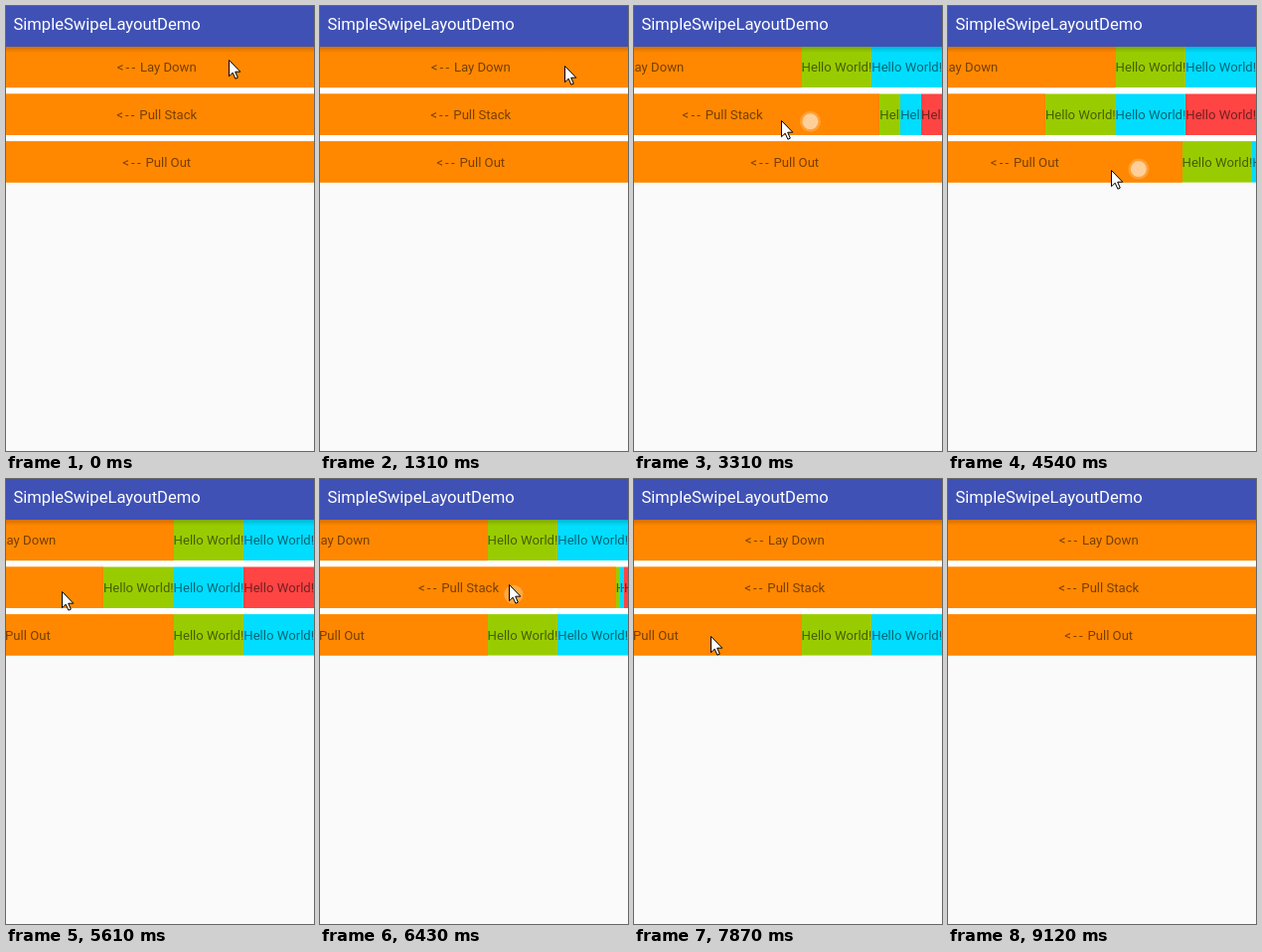
An HTML page with a canvas that plays this animation: 310 px wide and 448 px high, repeating every 9.84 s.

```html
<!DOCTYPE html>
<html lang="en">
<head>
<meta charset="utf-8">
<title>SimpleSwipeLayoutDemo</title>
<style>
  html, body { margin: 0; width: 100%; height: 100%; overflow: hidden; background: #fafafa; }
  canvas { display: block; width: 310px; height: 448px; }
</style>
</head>
<body>
<canvas id="stage"></canvas>
<script>
const W = 310, H = 448, HEADER = 41;
const LOOP = 9840, START = 500, TICK = 134.7, POINTER_GONE = 9100;
const DRAG = 480, GLIDE = 450, SLIDE_DELAY = 150, SLIDE = 560;
const ROW_TOP = 40.5, ROW_PITCH = 47.8, ROW_H = 41.7, ITEM_W = 70.7, BASELINE = 25.5;
const ORANGE = '#ff8800', GREEN = '#99cc00', CYAN = '#00ddff', RED = '#ff4444';
const TEXT = 'rgba(0,0,0,.54)', FONT = '13.13px Roboto, sans-serif';

const rows = [
  { label: 'Lay Down', kind: 'under', colors: [GREEN, CYAN] },
  { label: 'Pull Stack', kind: 'stack', colors: [GREEN, CYAN, RED] },
  { label: 'Pull Out', kind: 'follow', colors: [GREEN, CYAN] }
];

// Pointer strokes; those with a row swipe it open or closed.
const moves = [
  { start: 500, from: [224, 54], to: [246, 60] },
  { start: 1745, from: [246, 60], to: [168, 88], row: 0, open: true },
  { start: 2939, from: [246, 112], to: [138, 115], row: 1, open: true },
  { start: 4106, from: [256, 156], to: [162, 165], row: 2, open: true },
  { start: 5090, from: [78, 185], to: [56, 113] },
  { start: 5875, from: [60, 112], to: [199, 110], row: 1, open: false },
  { start: 6910, from: [64, 57], to: [190, 62], row: 0, open: false },
  { start: 8000, from: [77, 158], to: [200, 163], row: 2, open: false }
];
const exit = [250, 433];

const canvas = document.getElementById('stage');
const ctx = canvas.getContext('2d');
const dpr = window.devicePixelRatio || 1;
canvas.width = W * dpr;
canvas.height = H * dpr;
ctx.scale(dpr, dpr);

const arrow = new Path2D('M.5 .5V16.7L4.2 13.2L6.9 19.2L9.3 18.1L6.7 12.2H11.8Z');

const clamp = x => Math.min(1, Math.max(0, x));
const ease = x => clamp(x) ** 2 * (3 - 2 * clamp(x));
const mix = (a, b, k) => a.map((v, i) => v + (b[i] - v) * k);

// Steeper than ease: a slow drag, a quick middle, a soft settle.
function slide(x) {
  const a = clamp(x) ** 3, b = (1 - clamp(x)) ** 3;
  return a / (a + b);
}

const snap = t => START + TICK * Math.floor((t - START) / TICK + 0.3);
const rowTop = index => ROW_TOP + ROW_PITCH * index;

function pointerAt(t) {
  const index = Math.max(0, moves.findLastIndex(move => move.start <= t));
  const { start, from, to } = moves[index];
  const elapsed = t - start;
  if (elapsed <= DRAG) return mix(from, to, ease(elapsed / DRAG));
  const next = index + 1 < moves.length ? moves[index + 1].from : exit;
  return mix(to, next, ease((elapsed - DRAG) / GLIDE));
}

function openness(index, t) {
  const move = moves.findLast(m => m.row === index && m.start <= t);
  if (!move) return 0;
  const progress = slide((t - move.start - SLIDE_DELAY) / SLIDE);
  return move.open ? progress : 1 - progress;
}

function rect(x, y, w, h, color) {
  ctx.fillStyle = color;
  ctx.fillRect(x, y, w, h);
}

function text(str, x, y, color = TEXT, font = FONT) {
  ctx.font = font;
  ctx.fillStyle = color;
  ctx.fillText(str, x, y);
}

function drawItem(left, right, top, color) {
  const x = Math.round(left), width = Math.round(right) - x;
  ctx.save();
  ctx.beginPath();
  ctx.rect(x, top, width, ROW_H);
  ctx.clip();
  rect(x, top, width, ROW_H, color);
  text('Hello World!', left, top + BASELINE);
  ctx.restore();
}

function drawRow({ label, kind, colors }, index, t) {
  const top = rowTop(index), full = colors.length * ITEM_W;
  const offset = full * openness(index, t), edge = W - offset;
  const width = kind === 'stack' ? offset / colors.length : ITEM_W;
  const left = kind === 'under' ? W - full : edge;
  if (offset > 0) {
    colors.forEach((color, i) => drawItem(left + i * width, left + (i + 1) * width, top, color));
  }
  rect(0, top, Math.round(edge), ROW_H, ORANGE);

  ctx.font = FONT;
  const arrowWidth = 23.2;
  const x = 151.7 - (arrowWidth + ctx.measureText(label).width) / 2 - offset;
  ctx.letterSpacing = '2.2px';
  text('<--', x, top + BASELINE);
  ctx.letterSpacing = '0px';
  text(label, x + arrowWidth, top + BASELINE);
}

function drawHeader() {
  const shadow = ctx.createLinearGradient(0, HEADER, 0, HEADER + 6);
  shadow.addColorStop(0, 'rgba(0,0,0,.18)');
  shadow.addColorStop(1, 'rgba(0,0,0,0)');
  rect(0, HEADER, W, 6, shadow);
  rect(0, 0, W, HEADER, '#3f51b5');
  text('SimpleSwipeLayoutDemo', 7.4, 24, '#fff', '16.6px Roboto, sans-serif');
}

function disc(x, y, radius, alpha) {
  ctx.fillStyle = `rgba(255,255,255,${alpha})`;
  ctx.beginPath();
  ctx.arc(x, y, radius, 0, 2 * Math.PI);
  ctx.fill();
}

// The contact dot falls short of the pointer and fades after release.
function drawTouch(t) {
  const move = moves.findLast(m => m.row !== undefined && m.start + TICK / 2 <= t);
  if (!move || t > move.start + DRAG + TICK) return;
  const reach = move.open ? 0.7 : 0.97;
  const [x] = mix(move.from, move.to, reach * ease((t - move.start) / DRAG));
  const y = rowTop(move.row) + 28;
  if (t > move.start + DRAG) {
    disc(x, y, 9.5, 0.28);
  } else {
    disc(x, y, 10.5, 0.2);
    disc(x, y, 8, 0.5);
  }
}

function drawPointer(t) {
  if (t > POINTER_GONE) return;
  const [x, y] = pointerAt(t);
  ctx.save();
  ctx.translate(Math.round(x), Math.round(y));
  ctx.fillStyle = '#fff';
  ctx.fill(arrow);
  ctx.strokeStyle = '#000';
  ctx.stroke(arrow);
  ctx.restore();
}

function frame(now) {
  const t = snap(now % LOOP);
  rect(0, 0, W, H, '#fafafa');
  rect(0, HEADER, W, rowTop(2) - HEADER, '#fff');
  rows.forEach((row, index) => drawRow(row, index, t));
  drawHeader();
  drawTouch(t);
  drawPointer(t);
  requestAnimationFrame(frame);
}
requestAnimationFrame(frame);
</script>
</body>
</html>
```
